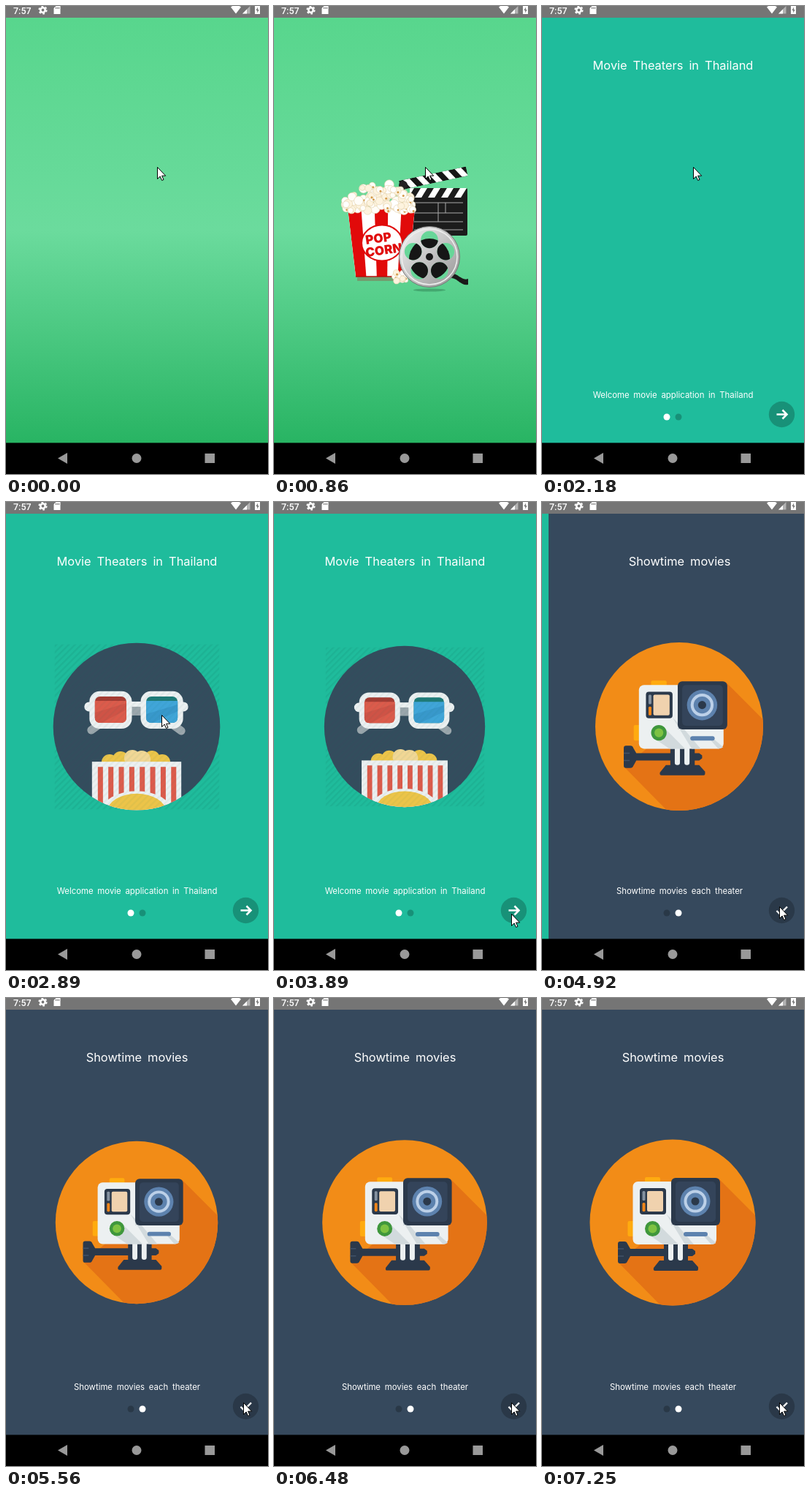
Recreate the animation shown at these times as an HTML page. Size 359 by 640 pixels, loop 8 s.

```html
<!DOCTYPE html>
<html lang="en">
<head>
<meta charset="utf-8">
<title>Movie app intro</title>
<style>
html, body { margin: 0; width: 100%; height: 100%; overflow: hidden; background: #000; }
svg { display: block; width: 359px; height: 640px; }
text { font-family: Roboto, "Open Sans", sans-serif; }
.title, .sub { font-family: Inter, Roboto, sans-serif; fill: #fff; text-anchor: middle; }
.title { font-size: 16.4px; word-spacing: 3.4px; }
.sub { font-size: 11.4px; word-spacing: 2.5px; }
.label { font: 900 17px Inter, "DejaVu Sans", sans-serif; fill: #e00b0b; text-anchor: middle; }
</style>
</head>
<body>
<svg viewBox="0 0 359 640" xmlns="http://www.w3.org/2000/svg">
  <defs>
    <linearGradient id="green" x2="0" y2="1">
      <stop stop-color="#58d68d"/><stop offset=".5" stop-color="#6bdb9d"/><stop offset="1" stop-color="#28b463"/>
    </linearGradient>
    <linearGradient id="silver" x2="1" y2="1">
      <stop stop-color="#f4f4f4"/><stop offset=".5" stop-color="#c4c4c4"/><stop offset="1" stop-color="#949494"/>
    </linearGradient>
    <pattern id="hatch" width="6" height="6" patternUnits="userSpaceOnUse" patternTransform="rotate(45)">
      <rect width="2.4" height="6" fill="#0b6b5a"/>
    </pattern>
    <clipPath id="disc"><circle cx="179" cy="307" r="114"/></clipPath>
    <clipPath id="disc2"><circle cx="179" cy="307" r="113.5"/></clipPath>
    <clipPath id="arm"><rect width="94" height="13" rx="1"/></clipPath>
    <clipPath id="bar"><rect x="186" y="249" width="80" height="13"/></clipPath>
    <clipPath id="bucket"><path d="M101 277H193L184 370H112Z"/></clipPath>
    <clipPath id="reelHoles"></clipPath>
  </defs>

  <g id="splash">
    <rect y="16" width="359" height="582" fill="url(#green)"/>
    <g id="logo">
      <g transform="translate(171 239) rotate(-12)" clip-path="url(#arm)">
        <rect width="94" height="13" fill="#151515"/><g id="armStripes" fill="#fff"/>
      </g>
      <circle cx="177" cy="245" r="6" fill="#222"/>
      <rect x="186" y="249" width="79" height="65" rx="2" fill="#1c1c1c"/>
      <g clip-path="url(#bar)"><g id="barStripes" fill="#fff"/></g>
      <path d="M192 269H259M192 283H259M192 295H259M192 306H259M225 269V295M235 269V283" fill="none" stroke="#aaa"/>
      <path d="M114 371H183L182 376H114Z" fill="#a22" opacity=".3"/>
      <g clip-path="url(#bucket)">
        <rect x="98" y="270" width="100" height="104" fill="#fff"/><g id="bucketStripes" fill="#e10a0a"/>
      </g>
      <path d="M112 370H184" stroke="#b80808" stroke-width="1.5"/>
      <g id="corn" stroke="#e3cfa6" stroke-width=".6"/>
      <ellipse cx="148" cy="324" rx="28" ry="24.5" fill="#fff" stroke="#e10a0a" stroke-width="2"/>
      <g transform="rotate(-8 148 324)">
        <text class="label" x="144" y="323">POP</text><text class="label" x="149" y="340">CORN</text>
      </g>
      <ellipse cx="213" cy="388.500" rx="22" ry="2" fill="#1d5c3a" opacity=".35"/>
      <path d="M236 374C250 366 254 384 266 381V373C258 376 254 368 246 366Z" fill="#1a1a1a"/>
      <circle cx="213" cy="343" r="41.5" fill="url(#silver)" stroke="#777"/>
      <circle cx="213" cy="343" r="38" fill="none" stroke="#eee" stroke-width="1.5"/>
      <g clip-path="url(#reelHoles)">
        <rect x="172" y="302" width="82" height="82" fill="#68d699"/>
        <circle cx="213" cy="346" r="28" fill="#161616"/>
      </g>
      <circle cx="213" cy="343" r="5" fill="#191919"/>
    </g>
  </g>

  <g id="intro">
    <rect id="teal" y="16" width="359" height="582" fill="#1fbc9c"/>
    <rect id="slate" y="16" width="359" height="582" fill="#36495d"/>
    <g id="page1">
      <text class="title" x="179.5" y="87">Movie Theaters in Thailand</text>
      <text class="sub" x="179.5" y="536">Welcome movie application in Thailand</text>
      <g class="art">
        <rect x="67" y="195" width="225" height="225" fill="url(#hatch)" opacity=".12"/>
        <circle cx="179" cy="307" r="114" fill="#344c5d"/>
        <g stroke="#9ba6ac" stroke-width="11" stroke-linecap="round"><path d="M117 312L128 304M240 313L229 305"/></g>
        <rect x="168" y="279" width="21" height="13" fill="#9ba6ac"/>
        <g fill="#ecf0f1">
          <rect x="168" y="273" width="21" height="7"/>
          <circle cx="114" cy="280" r="6.5"/><circle cx="243" cy="280" r="6.5"/>
          <rect x="114.500" y="259" width="58" height="51" rx="14"/>
          <rect x="184.500" y="259" width="58" height="51" rx="14"/>
        </g>
        <rect x="122" y="266" width="43" height="36" rx="7" fill="#a73c33"/>
        <path d="M122 272H165V295Q165 302 158 302H129Q122 302 122 295Z" fill="#dc5b4b"/>
        <path d="M122 288L165 275V284L131 302Q122 302 122 295Z" fill="#c74f43" opacity=".6"/>
        <rect x="192" y="266" width="43" height="36" rx="7" fill="#1f7b78"/>
        <path d="M192 272H235V295Q235 302 228 302H199Q192 302 192 295Z" fill="#40a5d8"/>
        <path d="M192 290L235 277V286L201 302Q192 302 192 295Z" fill="#338fc4" opacity=".6"/>
        <g clip-path="url(#disc)">
          <g fill="#ecc449">
            <circle cx="142" cy="356" r="11"/><circle cx="157" cy="352" r="11"/>
            <circle cx="200" cy="351" r="11"/><circle cx="214" cy="356" r="11"/>
          </g>
          <g fill="#f1d795"><circle cx="173" cy="350" r="11"/><circle cx="186" cy="352" r="12"/></g>
          <rect x="118" y="355" width="122" height="70" fill="#ecf0f1"/>
          <g id="boxStripes" fill="#dd5b4b"/>
          <ellipse cx="179" cy="423" rx="48" ry="28" fill="#ecf0f1"/>
          <ellipse cx="179" cy="423" rx="40" ry="24.5" fill="#ecc449"/>
        </g>
        <circle cx="179" cy="307" r="114" fill="url(#hatch)" opacity=".05"/>
      </g>
    </g>
    <g id="page2">
      <text class="title" x="179.5" y="87">Showtime movies</text>
      <text class="sub" x="179.5" y="536">Showtime movies each theater</text>
      <g class="art">
        <circle cx="179" cy="307" r="113.500" fill="#f28c17"/>
        <path d="M242 247L300 305V430H172L105 362Z" fill="#e47315" clip-path="url(#disc2)"/>
        <g fill="#ffab0f"><rect x="141" y="245" width="21" height="10" rx="2"/><rect x="117.500" y="305" width="12" height="21" rx="2"/></g>
        <g fill="#2b394b">
          <path d="M107 333H113Q116 333 117 336L121 343H206L210 346V350L206 353H121L117 360Q116 363 113 363H107Q104 363 104 360V336Q104 333 107 333Z"/>
          <rect x="167" y="335" width="33" height="26"/>
          <path d="M161 359H206L214 368V371Q214 373 212 373H155Q152 373 153 369Z"/>
        </g>
        <path d="M104 343H112M104 353H112" stroke="#415268" stroke-width="1.5"/>
        <g fill="#ecf0f1">
          <path d="M173 336H180V356Q180 359 176.500 359T173 356ZM186 336H193V356Q193 359 189.500 359T186 356Z"/>
          <rect x="124.500" y="251" width="114.500" height="86" rx="7"/>
        </g>
        <path d="M159 309L187 337H166L145 323ZM170 295L177 302V311H186L208 337H196ZM226 324L238.500 335Q236 337 232 337L222 326Z" fill="#d2dadd"/>
        <rect x="134" y="260" width="36" height="36" rx="4" fill="#2b394b"/>
        <rect x="137.500" y="264" width="4" height="13" rx="1.500" fill="#8592a0"/>
        <rect x="137.500" y="280" width="4" height="12" rx="1.500" fill="#f08519"/>
        <rect x="144" y="264" width="22" height="28" rx="2" fill="#f0d2ae"/>
        <rect x="177" y="246" width="67" height="65" rx="6" fill="#2b394b"/>
        <rect x="183" y="251" width="55" height="55" rx="5" fill="#34445a"/>
        <circle cx="210" cy="278" r="20.500" fill="#5d82ae"/>
        <circle cx="210" cy="278" r="15.500" fill="#bcd0e8"/>
        <circle cx="210" cy="278" r="11.500" fill="#5d82ae"/>
        <circle cx="210" cy="278" r="5.500" fill="#2b394b"/>
        <circle cx="151.500" cy="315.500" r="10.500" fill="#3f973c"/>
        <circle cx="151.500" cy="315.500" r="6" fill="#7dc242"/>
        <rect x="194" y="320" width="33" height="6" rx="3" fill="#5d82ae"/>
      </g>
    </g>
    <circle id="dot1" cx="171" cy="562" r="4.500"/>
    <circle id="dot2" cx="187" cy="562" r="4.500"/>
    <circle id="fab" cx="328.500" cy="558.500" r="17.700"/>
    <path id="next" d="M321.500 558.500H335M329.500 552.500L335.500 558.500L329.500 564.500" fill="none" stroke="#fff" stroke-width="2.600"/>
    <path id="done" d="M321.500 559L326 563.500L336 553.500" fill="none" stroke="#fff" stroke-width="2.400"/>
  </g>

  <rect width="359" height="16" fill="#757575"/>
  <g fill="#fff">
    <text x="10" y="10.500" font-size="12.500" font-weight="500">7:57</text>
    <circle cx="50.500" cy="5.500" r="3.200" fill="none" stroke="#fff" stroke-width="2.600"/>
    <circle cx="50.500" cy="5.500" r="5.200" fill="none" stroke="#fff" stroke-width="1.800" stroke-dasharray="2.700 2.745"/>
    <path d="M68.500 0H74.500V11H65.500V3Z"/>
    <path d="M68.500 1.500V4M70.500 1.500V4M72.500 1.500V4" stroke="#757575"/>
    <path d="M308 1.500Q315 -4 322 1.500L315 10.500Z"/>
    <path d="M324 10.500L334.500 0V10.500Z" opacity=".45"/><path d="M324 10.500L330 4.500V10.500Z"/>
    <path d="M341 0H348V11H341Z"/><path d="M345 1.500L342.500 6H344.200V9.500L346.700 5H345Z" fill="#757575"/>
  </g>
  <rect y="597.400" width="359" height="43"/>
  <g fill="#999"><path d="M71 618.500L84 611V626Z"/><circle cx="179" cy="618.500" r="6.500"/><rect x="272.500" y="612" width="13.500" height="13"/></g>
  <path id="cursor" d="M.5 .5V16.500L4.200 13L6.600 18.500L9 17.500L6.600 12.200H11.700Z" fill="#fff" stroke="#000"/>
</svg>
<script>
const LOOP = 8000, WIDTH = 359, SPACING = 363, TICK = 78.18, ANCHOR = 4610;
const $ = id => document.getElementById(id);
const clamp = v => Math.max(0, Math.min(1, v));
const smooth = u => u * u * (3 - 2 * u);

function add(parent, tag, attrs) {
  const el = document.createElementNS('http://www.w3.org/2000/svg', tag);
  for (const k in attrs) el.setAttribute(k, attrs[k]);
  parent.append(el);
}

function stripes(id, n, x, y, step, w, h, lean) {
  for (let i = 0; i < n; i++)
    add($(id), 'path', { d: `M${x + i * step} ${y}h${w}l${lean} ${h}h${-w}Z` });
}
stripes('armStripes', 5, 6, 0, 18, 9, 13, 8);
stripes('barStripes', 5, 183, 249, 18, 9, 13, -8);
stripes('boxStripes', 8, 126, 362, 14.3, 7, 60, 0);

// bucket stripes taper towards the bottom
for (let i = 0; i < 5; i += 2) {
  const top = 101 + i * 18.4, foot = 112 + i * 14.4;
  add($('bucketStripes'), 'path', { d: `M${top} 277h18.4L${foot + 14.4} 370H${foot}Z` });
}

for (let i = 0; i < 5; i++) {
  const a = (i * 72 - 90) * Math.PI / 180;
  add($('reelHoles'), 'circle', { cx: 213 + 23.5 * Math.cos(a), cy: 343 + 23.5 * Math.sin(a), r: 11.8 });
}

let seed = 11;
const rand = () => (seed = seed * 16807 % 2147483647) / 2147483647;
function kernel(x, y, r) {
  const fill = ['#fff', '#fffdf8', '#fdf3de'][Math.floor(rand() * 3)];
  add($('corn'), 'circle', { cx: x, cy: y, r, fill });
  if (rand() < .35)
    add($('corn'), 'circle', { cx: x + 1, cy: y + 2, r: 1.5, fill: '#d39a4a', stroke: 'none' });
}
for (let i = 0; i < 110; i++) {
  const x = 97 + rand() * 96;
  const top = 242 + 27 * ((x - 145) / 50) ** 2;
  kernel(x, top + rand() * Math.max(0, 280 - top), 3.5 + rand() * 3);
}
for (let i = 0; i < 14; i++) kernel(165 + rand() * 16, 362 + rand() * 14, 3 + rand() * 2);

// rows: time, then values
const pulse = [[2250, 222], [2650, 231], [3700, 221], [4800, 230], [5800, 221], [6150, 221.5], [6750, 232], [7110, 227]];
const pointer = [[2500, 207, 220], [2890, 213, 291], [3000, 213, 291], [3650, 325, 563], [3900, 325, 563], [4200, 325, 553]];

function track(rows, t) {
  if (t <= rows[0][0]) return rows[0].slice(1);
  const i = rows.findIndex(r => r[0] > t);
  if (i < 0) return rows[rows.length - 1].slice(1);
  const a = rows[i - 1], b = rows[i], u = smooth((t - a[0]) / (b[0] - a[0]));
  return a.slice(1).map((v, k) => v + (b[k + 1] - v) * u);
}

const set = (id, k, v) => $(id).setAttribute(k, v);
const art = [...document.querySelectorAll('.art')];

function draw(now) {
  const raw = now % LOOP;
  const t = ANCHOR + Math.floor((raw - ANCHOR) / TICK + .001) * TICK;
  const intro = raw >= 2180;
  $('splash').style.display = intro ? 'none' : '';
  $('intro').style.display = intro ? '' : 'none';
  set('logo', 'opacity', clamp((t - 170) / 680));

  const p = 1 - (1 - clamp((t - 4531) / 600)) ** 5;
  set('slate', 'x', Math.round((1 - p) * WIDTH));
  set('page1', 'transform', `translate(${-p * SPACING} 0)`);
  set('page2', 'transform', `translate(${(1 - p) * SPACING} 0)`);

  const size = track(pulse, t)[0];
  art.forEach((g, i) => {
    const s = size / (i ? 227 : 229);
    g.setAttribute('transform', `translate(179 307) scale(${s}) translate(-179 -307)`);
    g.style.display = raw < 2250 ? 'none' : '';
  });

  const second = p >= .5, dim = 'rgba(0,0,0,.23)';
  set('dot1', 'fill', second ? dim : '#fff');
  set('dot2', 'fill', second ? '#fff' : dim);
  const nextOn = clamp(1 - p * 2), doneOn = clamp((p - .35) / .65);
  set('next', 'opacity', nextOn);
  set('done', 'opacity', doneOn);
  set('fab', 'fill', `rgba(0,0,0,${.23 * Math.max(nextOn, doneOn)})`);

  const [x, y] = track(pointer, t);
  set('cursor', 'transform', `translate(${Math.round(x)} ${Math.round(y)})`);
}

function frame() {
  draw(performance.now());
  requestAnimationFrame(frame);
}
frame();
</script>
</body>
</html>
```
